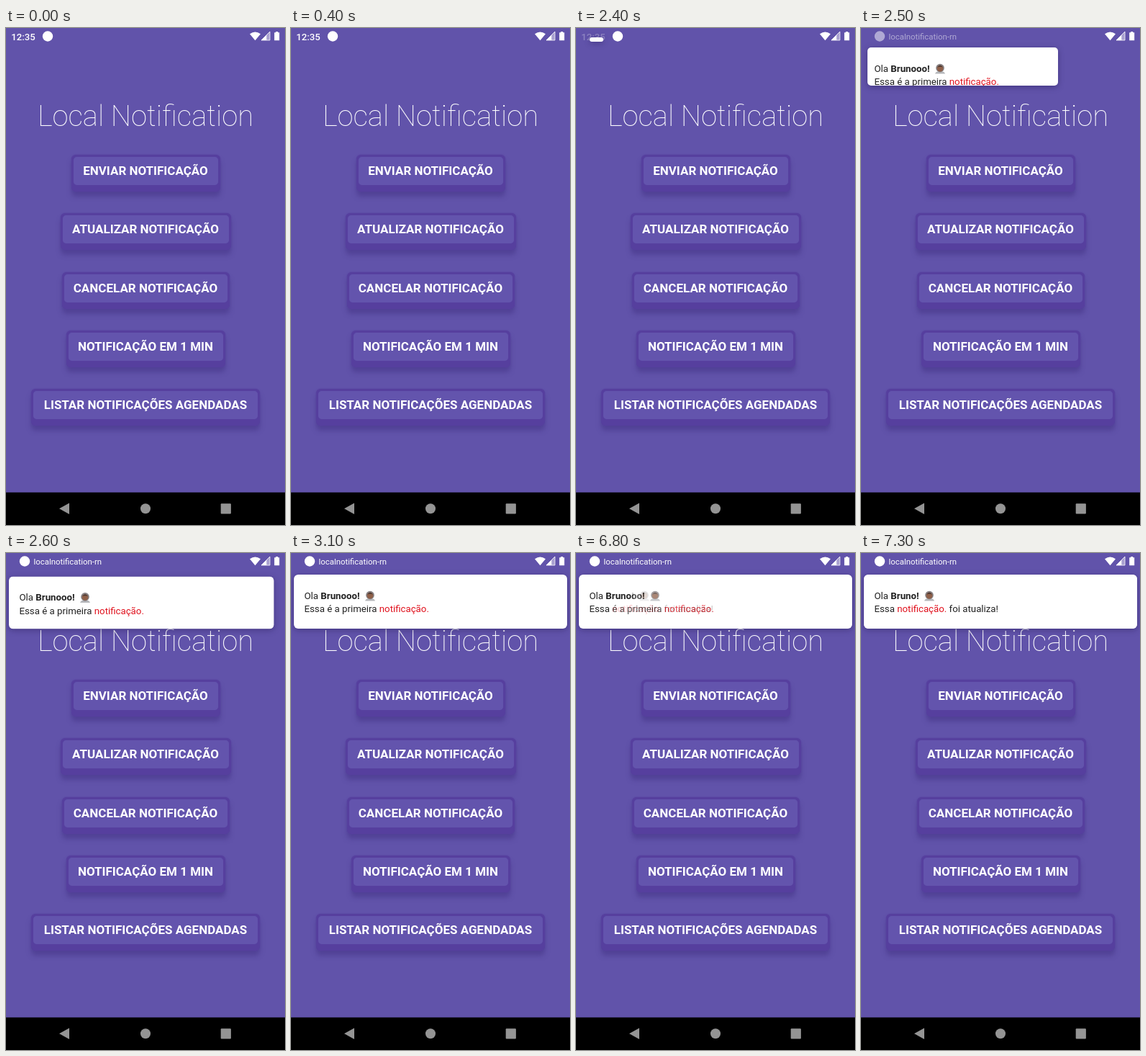
An HTML page that plays this animation: 388x690 px, repeating every 8 s.

```html
<!DOCTYPE html>
<html lang="pt">
<head>
<meta charset="utf-8">
<title>Local Notification</title>
<style>
  html, body { margin: 0; width: 100%; height: 100%; overflow: hidden; background: #6153aa; }
  body { position: relative; font-family: Roboto, sans-serif; color: #fff; }
  svg { position: absolute; left: 0; top: 0; display: block; }
  text { font-family: Roboto, sans-serif; }

  .anim { animation: 8s step-end -30ms infinite; }

  .btn {
    position: absolute; left: 194px; width: var(--w); height: 51px;
    top: calc(176px + var(--row) * 81.25px);
    margin-left: calc(var(--w) / -2);
    border-radius: 6px; background: #563f9e;
    box-shadow: 0 0 2px #563f9e, 0 7px 6px rgba(66, 50, 132, .5);
  }
  .btn span {
    position: absolute; inset: 3px 3px 9px; border-radius: 5px; background: #6354ad;
    box-shadow: 0 0 1px #6354ad;
    font: 700 17px/39px Roboto, sans-serif; text-align: center; white-space: nowrap;
  }
  .send { animation-name: send; }
  .update { animation-name: update; }
  /* the label fades a little more than the button body */
  @keyframes send {
    0% { opacity: 1; color: #fff }
    12.5% { opacity: .9; color: #ffffffe6 }
    13.75% { opacity: .78; color: #ffffffb3 }
    15% { opacity: .83; color: #ffffffbf }
    16.25% { opacity: .92; color: #ffffffe0 }
    17.5% { opacity: .97; color: #fffffff5 }
    18.75%, 100% { opacity: 1; color: #fff }
  }
  @keyframes update {
    0% { opacity: 1 } 72.5% { opacity: .68 } 73.75% { opacity: .55 }
    75% { opacity: .82 } 76.25%, 100% { opacity: 1 }
  }

  /* status bar swap */
  .clock { animation-name: clock; }
  .badge { animation-name: badge; }
  .app { animation-name: app; }
  @keyframes clock {
    0% { opacity: 1 } 28.75% { opacity: .7 } 30% { opacity: .28 } 31.25%, 100% { opacity: 0 }
  }
  @keyframes badge { 0% { opacity: 1 } 31.25%, 100% { opacity: 0 } }
  @keyframes app { 0% { opacity: 0 } 31.25% { opacity: .5 } 32.5%, 100% { opacity: 1 } }

  /* the card unfolds from a small pill in the status bar */
  .shade { position: absolute; inset: 0; filter: drop-shadow(0 2px 4px rgba(25, 15, 70, .4)); }
  .card {
    position: absolute; left: 4px; top: 30px; width: 380px; height: 75px;
    background: #fff; animation-name: unfold;
  }
  .fresh { background: #fff; animation-name: swap; }
  .card svg { border-radius: 6px; }
  @keyframes unfold {
    0% { visibility: hidden; transform: translateY(-17px); clip-path: inset(0 346px 69px 15px round 3px) }
    30% { visibility: visible; transform: translateY(-17px); clip-path: inset(0 346px 69px 15px round 3px) }
    31.25% { visibility: visible; transform: translateY(-3px); clip-path: inset(0 110px 22px 5px round 5px) }
    32.5% {
      visibility: visible; transform: translateY(2.4px); clip-path: inset(0 11.5px 2px 0 round 6px);
      animation-timing-function: steps(5, end);
    }
    38.75%, 100% { visibility: visible; transform: none; clip-path: inset(0 0 0 0 round 6px) }
  }
  @keyframes swap {
    0% { opacity: 0 }
    85% { opacity: 0; animation-timing-function: steps(4, start) }
    90%, 100% { opacity: 1 }
  }
</style>
</head>
<body>
<svg width="388" height="690" viewBox="0 0 388 690" fill="#fff">
  <text x="194" y="135.5" font-size="40" font-weight="100" text-anchor="middle">Local Notification</text>

  <text class="anim clock" x="7.2" y="16.5" font-size="13.2" font-weight="500">12:35</text>
  <circle class="anim badge" cx="58" cy="11.5" r="7.2"/>
  <g class="anim app">
    <circle cx="26" cy="11.5" r="7.2"/>
    <text x="38.5" y="16" font-size="11.4">localnotification-rn</text>
  </g>

  <path d="M339 8.3Q346.5 2.8 354 8.3L346.5 17.2Z"/>
  <path d="M367 5V17H355Z" opacity=".45"/>
  <path d="M362.3 9.7V17H355Z"/>
  <path d="M367 5V17H355Z" fill="none" stroke="#fff" stroke-width=".8"/>
  <path d="M375.2 5h3v1.3h2v10.9h-7V6.3h2Z"/>

  <path d="M0 644.7H388V690H0Z" fill="#000"/>
  <g fill="#949494">
    <path d="M74 667.3L88 659.5V675Z"/>
    <circle cx="194" cy="667.3" r="7"/>
    <rect x="298.7" y="660.2" width="14.2" height="14.2" rx="1"/>
  </g>
</svg>

<div class="btn anim send" style="--row:0;--w:207px"><span>ENVIAR NOTIFICAÇÃO</span></div>
<div class="btn anim update" style="--row:1;--w:237px"><span>ATUALIZAR NOTIFICAÇÃO</span></div>
<div class="btn" style="--row:2;--w:233px"><span>CANCELAR NOTIFICAÇÃO</span></div>
<div class="btn" style="--row:3;--w:221px"><span>NOTIFICAÇÃO EM 1 MIN</span></div>
<div class="btn" style="--row:4;--w:318px"><span>LISTAR NOTIFICAÇÕES AGENDADAS</span></div>

<div class="shade">
  <div class="card anim">
    <svg width="380" height="75" font-size="13.25" fill="#222">
      <defs>
        <g id="face">
          <path d="M0 14Q1 10.6 7 10.6T14 14Z" fill="#b4b6ba"/>
          <circle cx="7" cy="6" r="5.8" fill="#858083"/>
          <circle cx="7" cy="6.6" r="4.3" fill="#8f6049"/>
          <path d="M3 5.2Q7 -.6 11 5.2Q7 3.4 3 5.2Z" fill="#4a3730"/>
        </g>
      </defs>
      <text x="14.5" y="33.8">Ola <tspan font-weight="700">Brunooo!</tspan></text>
      <use href="#face" x="99" y="22.5"/>
      <text x="14.5" y="52.3">Essa é a primeira <tspan fill="#e0101c">notificação.</tspan></text>
    </svg>
    <svg class="anim fresh" width="380" height="75" font-size="13.25" fill="#222">
      <text x="14.5" y="33.8">Ola <tspan font-weight="700">Bruno!</tspan></text>
      <use href="#face" x="84" y="22.5"/>
      <text x="14.5" y="52.3">Essa <tspan fill="#e0101c">notificação.</tspan> foi atualiza!</text>
    </svg>
  </div>
</div>
</body>
</html>
```
